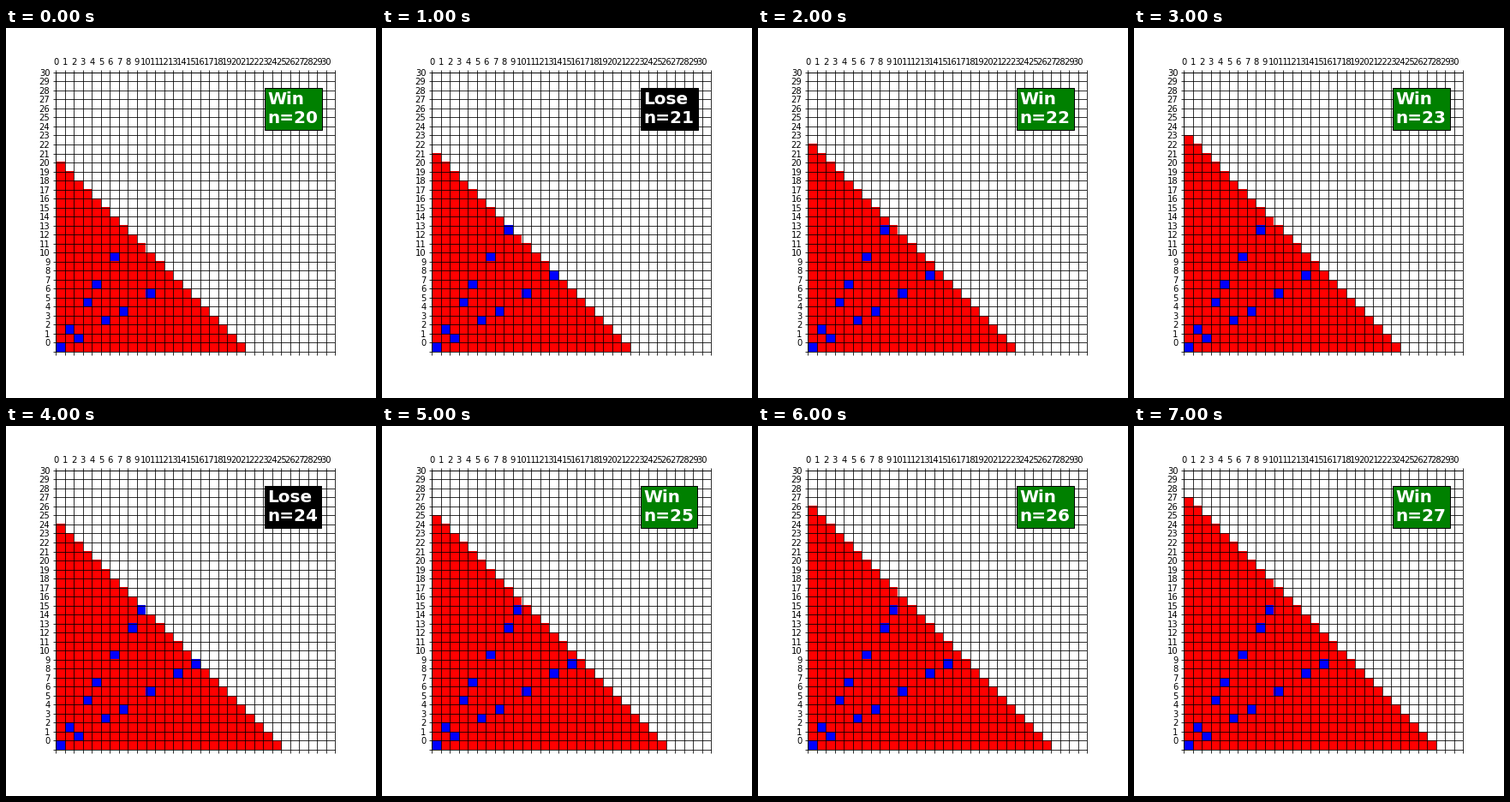
Recreate the animation shown at these times as a matplotlib script. Size 432 by 432 pixels, loop 8 s.

```python
import math

import matplotlib.pyplot as plt
import numpy as np
from matplotlib.animation import FuncAnimation
from matplotlib.colors import ListedColormap

SIZE = 31
START = 20
STEPS = 8
EMPTY, HOT, COLD = range(3)

plt.rcParams["font.family"] = "DejaVu Sans"


def cold_positions():
    """Losing positions of Wythoff's game on the board."""
    phi = (1 + math.sqrt(5)) / 2
    cells = set()
    for k in range(SIZE):
        a = int(k * phi)
        cells |= {(a, a + k), (a + k, a)}
    return cells


COLD_CELLS = cold_positions()


def board(n):
    """Cells reached with at most n tokens; row 0 lies at the bottom."""
    x, y = np.meshgrid(np.arange(SIZE), np.arange(SIZE))
    grid = np.where(x + y <= n, HOT, EMPTY)
    for a, b in COLD_CELLS:
        if a + b <= n:
            grid[b, a] = COLD
    return grid[::-1]


fig = plt.figure(figsize=(6, 6), dpi=72, facecolor="white")
fig.subplots_adjust(left=0.125, right=0.9, bottom=0.125, top=0.88)
ax = fig.add_subplot()
image = ax.matshow(board(START), cmap=ListedColormap(["white", "red", "blue"]),
                   vmin=EMPTY, vmax=COLD)

edges = np.arange(SIZE + 1) - 0.5
ax.set_xticks(edges, [*range(SIZE), ""])
ax.set_yticks(edges, [*reversed(range(SIZE)), ""])
ax.grid(color="black", linestyle="-", linewidth=0.8)

label = ax.text(23, 5.5, "", color="white", fontsize=20, weight="bold",
                va="bottom", bbox={"facecolor": "green"})


def update(i):
    n = START + i
    lose = any(a + b == n for a, b in COLD_CELLS)
    image.set_data(board(n))
    label.set_text(f"{'Lose' if lose else 'Win'}\nn={n}")
    label.get_bbox_patch().set_facecolor("black" if lose else "green")
    return image, label


anim = FuncAnimation(fig, update, frames=STEPS, interval=1000,
                     repeat=True, repeat_delay=0)
plt.show()
```
